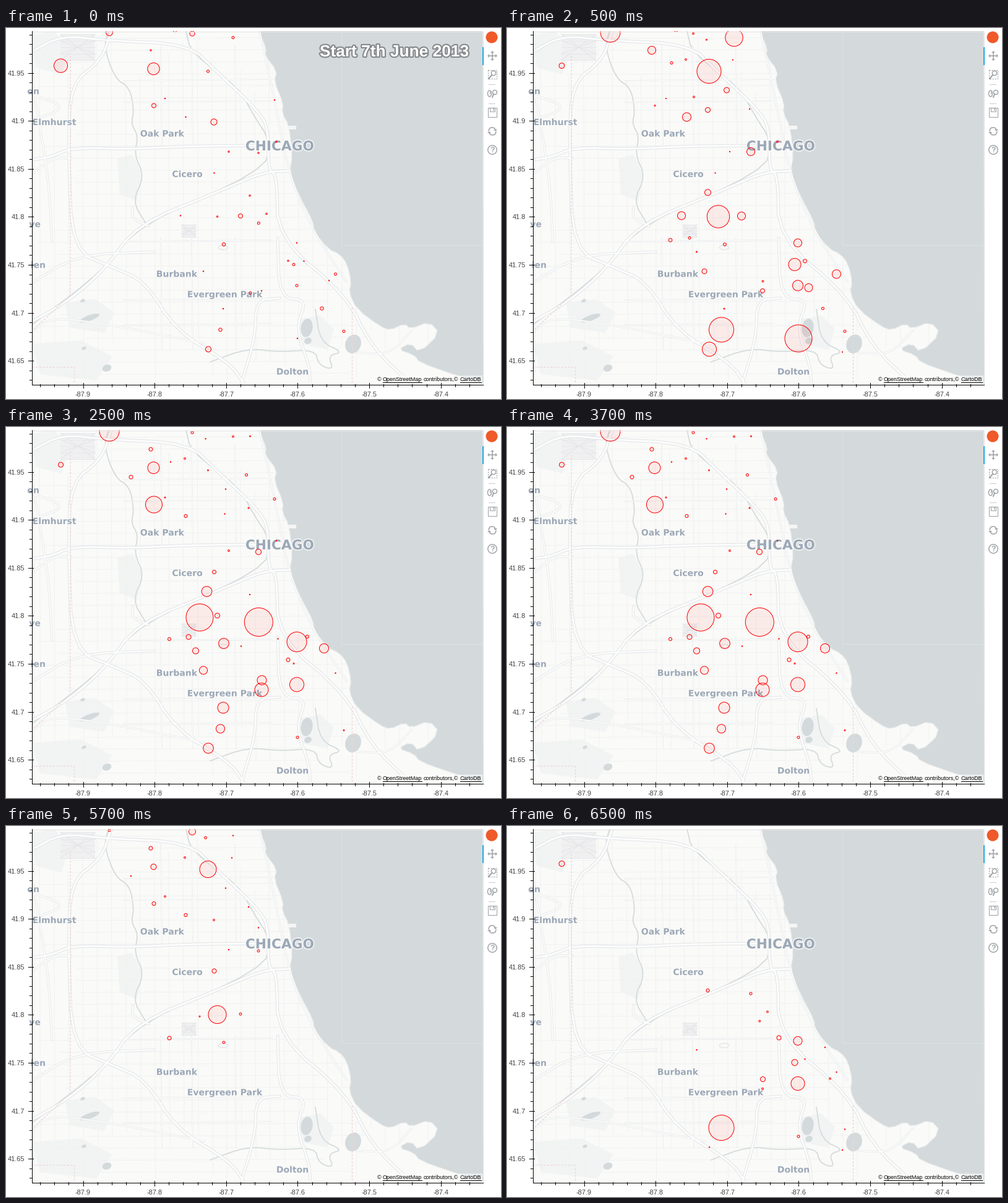
Animation, 800 px wide and 600 px high, one loop 8000 ms. Source, as a matplotlib script:

```python
import random

import matplotlib.pyplot as plt
from matplotlib import patheffects
from matplotlib.animation import FuncAnimation
from matplotlib.collections import PatchCollection
from matplotlib.patches import Circle, Ellipse, Polygon, Rectangle

W, H, DPI = 800, 600, 100
PT = 72 / DPI
LEFT, TOP, RIGHT, BOTTOM = 42, 5, 770.5, 576
LAND, WATER, PARK = "#fafaf8", "#d4dadc", "#f2f4f4"
LABEL, ICON = "#9ca8b8", "#a1a6a9"

fig = plt.figure(figsize=(W / DPI, H / DPI), dpi=DPI, facecolor="white")
ax = fig.add_axes([0, 0, 1, 1])
ax.set(xlim=(0, W), ylim=(H, 0))
ax.axis("off")
frame = Rectangle((LEFT, TOP), RIGHT - LEFT, BOTTOM - TOP, fc=LAND, ec="none")
ax.add_patch(frame)


def smooth(points, rounds=2):
    """Cut the corners of an open path."""
    for _ in range(rounds):
        cut = [points[0]]
        for (x0, y0), (x1, y1) in zip(points, points[1:]):
            cut += [(.75 * x0 + .25 * x1, .75 * y0 + .25 * y1),
                    (.25 * x0 + .75 * x1, .25 * y0 + .75 * y1)]
        points = cut + [points[-1]]
    return points


def line(points, color, width=1, z=2, on_map=False, **kw):
    xs, ys = zip(*points)
    item, = ax.plot(xs, ys, color=color, lw=width * PT, zorder=z, **kw)
    if on_map:
        item.set_clip_path(frame)


def shape(patch, z=1.5):
    ax.add_patch(patch).set(zorder=z)
    patch.set_clip_path(frame)


def area(points, color, z=1.5):
    shape(Polygon(points, fc=color, ec="none"), z)


def road(*points, width=5.2):
    path = smooth(points)
    line(path, "#e3e6e8", width, 3, True)
    line(path, "#fdfdfd", width * .58, 3.1, True)


def river(*points):
    line(smooth(points), WATER, 1.7, 2.5, True)


def pond(x, y, w, h, angle=-20):
    shape(Ellipse((x, y), w, h, angle=angle, fc=WATER, ec="none"), 2.2)


def text(x, y, s, size, color="#444444", font="Liberation Sans", z=8, **kw):
    return ax.text(x, y, s, fontsize=size * PT, color=color, family=font,
                   va="baseline", zorder=z, **kw)


def draw_land():
    rng = random.Random(7)
    for x, y, w, h in [(42, 5, 60, 70), (180, 205, 40, 75), (95, 438, 80, 55),
                       (42, 505, 130, 65), (475, 465, 55, 55)]:
        area([(x, y + 6), (x + w * .6, y), (x + w, y + h * .4),
              (x + w * .8, y + h), (x + w * .1, y + h * .85)], PARK, 1.1)
    for i in range(30):
        x, y = 54 + 23.2 * i, 17 + 19.4 * i
        line([(x, TOP + rng.randrange(120)), (x + 2, BOTTOM - rng.randrange(90))],
             "#f1f2f3", 1, 1.3, True)
        line([(LEFT + rng.randrange(90), y), (600 - rng.randrange(140), y - 2)],
             "#f1f2f3", 1, 1.3, True)
    for x, y, w, h in [(88, 10, 56, 42), (284, 318, 23, 20)]:
        shape(Rectangle((x, y), w, h, fc="#f0f0f1", ec="none"))
        for k in range(5):
            d = k * h / 4
            line([(x, y + d), (x + w, y + h - d)], "#e4e5e8", 1, 1.6, True)
            line([(x, y + d), (x + w, y + d)], "#e6e7ea", 1, 1.6, True)
    shape(Ellipse((351, 355), 15, 7, fc="none", ec="#e3e6e8"))


def draw_water():
    coast = smooth([
        (408, 5), (421, 34), (418, 44), (438, 70), (433, 86), (448, 122),
        (446, 137), (457, 158), (463, 206), (458, 232), (473, 270), (497, 315),
        (497, 328), (520, 357), (539, 366), (551, 381), (558, 411), (554, 428),
        (567, 455), (605, 483), (621, 489), (644, 478), (654, 487), (684, 475),
        (701, 494), (668, 525), (654, 509), (633, 520), (660, 529),
        (668, 541), (722, 560), (771, 576)], 1)
    area(coast + [(RIGHT, TOP)], WATER, 2)
    line(coast, "#eef0f0", 1.2, 2.1, True)
    shape(Rectangle((456, 158), 13, 6, fc="#f4f5f5", ec="none"), 2.1)
    line([(541.5, TOP), (541.5, 350.5), (RIGHT, 350.5)], "#dde2e4", 1, 2.1, True)

    pond(486, 485, 19, 30, 10)
    pond(488, 506, 12, 10)
    pond(561, 511, 25, 31, 20)
    pond(135, 469, 34, 9)
    pond(124, 441, 8, 5)
    pond(163, 550, 15, 11)
    pond(126, 518, 8, 5)

    river((166, 5), (158, 30), (176, 82), (200, 96), (207, 135), (202, 155),
          (214, 175), (207, 205), (224, 240), (204, 280), (226, 316))
    river((291, 5), (299, 40), (377, 97), (398, 138), (429, 185), (415, 232),
          (215, 318), (160, 390), (42, 480))
    river((330, 540), (390, 518), (440, 524), (500, 520), (505, 545),
          (530, 553), (520, 530), (545, 524), (508, 508), (500, 455))


def draw_roads():
    road((42, 213), (72, 209), (108, 193), (200, 196), (290, 191), (428, 190))
    road((42, 475), (100, 442), (160, 390), (212, 318), (340, 266),
         (415, 233), (458, 231))
    road((170, 5), (154, 53), (104, 90), (101, 200), (107, 360), (175, 388),
         (225, 410), (275, 490), (362, 542), (385, 576))
    road((42, 38), (90, 12), (160, 20), (295, 26), (340, 70), (414, 140),
         (424, 170), (424, 230), (438, 238), (439, 340), (550, 432),
         (590, 515), (655, 576))
    road((439, 340), (442, 437), (487, 439), (468, 485), (490, 545),
         (492, 576), width=4.6)
    road((442, 437), (404, 440), (403, 500), (380, 576), width=4.6)
    road((42, 412), (115, 367), (240, 362), width=4)
    road((42, 108), (100, 128), (42, 150), width=3.6)
    road((42, 236), (75, 210), (105, 210), width=3.6)
    road((42, 85), (60, 190), (70, 260), (74, 345), width=3.6)
    road((42, 492), (72, 467), (170, 480), (320, 510), width=3)
    road((410, 5), (437, 130), (456, 232), (494, 325), (550, 410), width=3)
    road((568, 525), (620, 528), (655, 490), width=3)
    road((205, 290), (203, 308), (230, 320), width=4)
    for x in (250, 300, 370):
        road((x, 30), (x + 2, 190), width=1.8)
        road((x, 340), (x + 2, 520), width=1.8)
    for y in (85, 120, 345, 440, 480):
        road((190, y), (430, y - 2), width=1.8)
    for path in ([(104, 45), (104, 432), (42, 490)],
                 [(42, 547.5), (110, 547.5), (110, 576)],
                 [(558.5, 452), (558.5, 576)]):
        line(path, "#eed6d6", 1.4, 3.2, True, dashes=(2.2, 1.8))


def place(x, y, name, size=14, ha="center"):
    halo = [patheffects.withStroke(linewidth=2, foreground=LAND)]
    text(x, y, name, size, LABEL, "DejaVu Sans", 4, ha=ha, weight="bold",
         path_effects=halo).set_clip_path(frame)


def draw_labels():
    place(78, 157, "Elmhurst")
    place(252.5, 175.5, "Oak Park")
    place(293, 241, "Cicero")
    place(276, 402.5, "Burbank")
    place(353.5, 435.5, "Evergreen Park")
    place(463, 560.5, "Dolton")
    place(442.5, 198, "CHICAGO", 21.7)
    place(54, 107, "on", ha="right")
    place(56, 322, "ve", ha="right")
    place(64, 388, "ien", ha="right")

    ax.add_patch(Rectangle((598, 562), 172, 13, fc="white", alpha=.5, zorder=7))
    for x, words in [(600, "©"), (609, "OpenStreetMap"),
                     (674.5, "contributors,©"), (734, "CartoDB")]:
        text(x, 571, words, 9, "black")
    for x0, x1 in [(609, 672), (734, 768)]:
        line([(x0, 572.5), (x1, 572.5)], "black", 1, 8)


def draw_axes():
    line([(LEFT, TOP + .5), (RIGHT, TOP + .5), (RIGHT, BOTTOM)], "#e5e5e5", 1, 6)
    line([(41.5, TOP), (41.5, 576.5), (RIGHT, 576.5)], "black", 1, 7)
    for i in range(-4, 33):
        y = 72.6 + 15.52 * i
        major = i % 5 == 0
        line([(36 if major else 38, y), (44 if major else 42, y)], "black", 1, 7)
        if major:
            text(30.5, y + 4, f"{41.95 - i / 100:.2f}".rstrip("0"), 11, ha="right")
    for i in range(-3, 28):
        x = 124.5 + 23.13 * i
        major = i % 5 == 0
        line([(x, 574 if major else 576), (x, 582 if major else 580)], "black", 1, 7)
        if major:
            text(x, 596, f"{-87.9 + i / 50:.1f}", 11, ha="center")


def draw_toolbar():
    def ring(x, y, r, h=None):
        ax.add_patch(Ellipse((x, y), 2 * r, h or 2 * r, fc="none", ec=ICON,
                             lw=1.5 * PT, zorder=8))

    def box(x, y, w, h, ls="-"):
        ax.add_patch(Rectangle((x, y), w, h, fc="none", ec=ICON, lw=1.1 * PT,
                               ls=ls, zorder=8))

    def arrow_head(x, y, dx, dy):
        ax.add_patch(Polygon([(x + 3 * dx, y + 3 * dy), (x + 3 * dy, y - 3 * dx),
                              (x - 3 * dy, y + 3 * dx)], fc=ICON, ec="none", zorder=8))

    ax.add_patch(Circle((785, 15), 9.5, fc="#f0592a", ec="none", zorder=8))
    line([(771, 31), (771, 60)], "#26aae1", 2, 8, solid_capstyle="butt")
    for y in (90.5, 121.5):
        line([(780, y), (790, y)], "#c8cbcd", 1, 8)

    for dx, dy in [(1, 0), (-1, 0), (0, 1), (0, -1)]:
        line([(786, 45), (786 + 6 * dx, 45 + 6 * dy)], ICON, 1.6, 8)
        arrow_head(786 + 5 * dx, 45 + 5 * dy, dx, dy)

    box(779, 68, 14, 14, (0, (2, 1.5)))
    ring(788, 73, 3.7)
    line([(785, 76), (780, 82)], ICON, 2.2, 8)

    ring(781.5, 106, 3, 10)
    line([(781.5, 103), (781.5, 106)], ICON, 1, 8)
    ring(790, 104, 3.5)
    line([(788, 107), (786, 112)], ICON, 2, 8)

    box(779, 129, 14, 15)
    box(782, 129, 8, 6)
    line([(788, 130), (788, 133)], ICON, 1.5, 8)

    for s in (1, -1):
        arc = [(-6, -1), (-4, -6), (3, -6), (5, -2)]
        line(smooth([(786 + s * x, 167 + s * y) for x, y in arc]), ICON, 1.6, 8)
        arrow_head(786 + s * 5, 167 - s * 3, 0, s)

    ring(786, 197, 7.2)
    text(786, 201.2, "?", 12, ICON, ha="center", weight="bold")


NORTH = dict(
    ohare=(88.5, 61), parkridge=(167, 7), niles=(273, 4), forest=(301, 9),
    sauganash=(322.5, 19), budlong=(367, 15.5), edgewater=(394.5, 15),
    norridge=(234, 36), dunning=(266, 56.5), portage=(289, 51),
    irving=(326.5, 70), ravenswood=(365, 51.5), harwood=(238.5, 66),
    schiller=(202, 81), lakeview=(388.5, 77.5), avondale=(355, 100.5),
    montclare=(257, 114), hermosa=(302, 111.5), elmwood=(239, 125.5),
    logan=(324.5, 132.5), austin=(290.5, 144), bucktown=(353.5, 140.5),
    humboldt=(336, 152), wicker=(392, 131), lincoln=(434, 116.5),
    river=(408, 164.5), loop=(437, 184), pilsen=(408, 202),
    garfield=(360, 200), medical=(394, 200), douglas=(336.5, 234.5))
SOUTH = dict(
    village=(324.5, 266), bridgeport=(394, 271), summit=(282, 303.5),
    archer=(313, 308), brighton=(341.5, 305), yards=(379, 304),
    fuller=(421, 300.5), canary=(408.3, 315.5), clearing=(264, 343),
    midway=(295, 339.5), gage=(352, 350), englewood=(380, 354.5),
    lawn=(306.5, 362), scottsdale=(319, 393.5), parkway=(439.5, 342.5),
    woodlawn=(470, 347.5), jackson=(487, 339), shore=(514, 358),
    grand=(456, 376.5), chatham=(465, 382.5), avalon=(481.5, 377),
    bush=(532.5, 398), calumet=(522, 408.5), burnside=(470, 416.5),
    pill=(487.5, 420), auburn=(413.5, 409.5), gresham=(413, 425),
    beverly=(395, 428.5), ashburn=(351, 454), greenwood=(346.5, 488),
    alsip=(327, 519.5), pullman=(471, 502), deering=(510.5, 453.5),
    eastside=(546, 490.5), hegewisch=(542, 524))
SITES = NORTH | SOUTH


def bubbles(sizes):
    """Rings for one period, from a map of radius to the sites of that size."""
    rings = [Circle(SITES[name], radius)
             for radius, names in sizes.items() for name in names.split()]
    group = PatchCollection(rings, facecolor=(1, 0, 0, .06), edgecolor="red",
                            linewidth=PT, zorder=5)
    ax.add_collection(group, autolim=False)
    group.set_clip_path(frame)
    return group


draw_land()
draw_water()
draw_roads()
draw_labels()
draw_axes()
draw_toolbar()

opening = bubbles({
    11: "ohare", 9.7: "harwood", 5.5: "parkridge", 5: "humboldt", 4.5: "alsip",
    4: "forest", 3.5: "elmwood yards", 2.7: "niles gage deering greenwood",
    2: "budlong irving canary chatham bush burnside beverly eastside",
    1.2: "norridge loop pilsen garfield bridgeport brighton fuller grand",
    .7: "montclare austin lincoln douglas summit woodlawn avalon scottsdale "
        "calumet gresham ashburn pullman"})
second = bubbles({
    22: "pullman", 20: "greenwood", 19.5: "irving", 18.2: "brighton",
    16: "parkridge", 14.2: "budlong", 11.5: "alsip", 10: "chatham",
    8.5: "burnside", 7: "austin bush",
    6.5: "norridge medical summit yards woodlawn pill", 5: "village",
    4.4: "ohare avondale", 4: "logan scottsdale", 3.4: "gresham",
    2.9: "clearing avalon", 2.4: "niles gage",
    2: "dunning midway deering eastside",
    1.4: "portage hermosa auburn forest loop",
    1: "sauganash elmwood lawn ashburn",
    .6: "ravenswood montclare wicker garfield douglas hegewisch"})
third = bubbles({
    23: "canary", 22: "archer", 16: "parkridge woodlawn", 13.5: "elmwood",
    11.5: "burnside", 11: "gresham", 9.5: "harwood", 9: "ashburn",
    8.3: "village gage alsip", 7.5: "shore auburn", 7: "greenwood",
    6.5: "scottsdale", 5: "lawn", 4.5: "pilsen", 4: "ohare brighton midway",
    3: "norridge schiller douglas grand", 2.5: "austin clearing jackson",
    2: "lakeview lincoln pullman forest", 1.4: "budlong portage garfield",
    1: "edgewater irving montclare wicker chatham eastside",
    .7: "sauganash dunning avondale bucktown loop bridgeport englewood "
        "parkway bush"})
fourth = bubbles({
    14.5: "brighton", 13.5: "irving", 5.5: "forest", 4.5: "harwood",
    3.5: "douglas", 3: "norridge elmwood clearing", 2.6: "austin",
    1.9: "parkridge sauganash pilsen yards gage",
    1.4: "portage montclare humboldt", 1: "archer",
    .7: "budlong ravenswood schiller avondale wicker river garfield"})
fifth = bubbles({
    20.5: "greenwood", 11: "burnside", 7: "woodlawn", 5: "chatham",
    4.5: "ohare", 4: "auburn", 3.5: "parkway", 2.6: "village",
    2: "bridgeport pullman", 1.4: "fuller canary calumet gresham",
    .7: "shore avalon lawn bush alsip eastside hegewisch"})
layers = [opening, second, third, fourth, fifth]

title = text(627.5, 46, "Start 7th June 2013", 26.3, "white", ha="center",
             weight="bold", z=9, path_effects=[
                 patheffects.withStroke(linewidth=3, foreground="#85898b")])


def update(step):
    # The opening period lasts one step, each later one four.
    current = (step + 3) // 4
    for i, layer in enumerate(layers):
        layer.set_visible(i == current)
    title.set_visible(current == 0)
    return [*layers, title]


animation = FuncAnimation(fig, update, frames=16, interval=500, repeat=True,
                          repeat_delay=0, blit=False)
plt.show()
```
